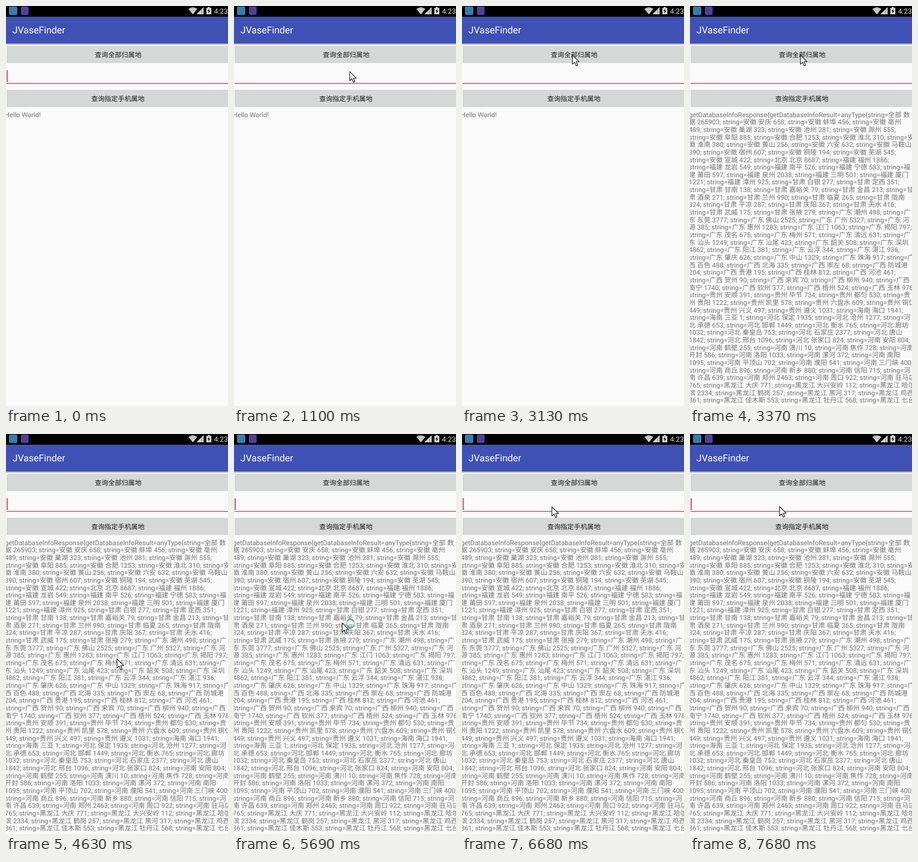
An HTML page that plays this animation: 373x673 px, repeating every 8 s.

```html
<!DOCTYPE html>
<html lang="zh-CN">
<head>
<meta charset="utf-8">
<title>JVaseFinder</title>
<style>
  html, body { margin: 0; width: 100%; height: 100%; overflow: hidden; background: #fafafa; }
  svg { display: block; width: 100vw; height: 100vh; }
  text {
    font-family: Roboto, "Noto Sans CJK SC", "Noto Sans CJK", sans-serif;
    font-size: 11.2px;
    text-rendering: geometricPrecision;
    white-space: pre;
  }
  .label { fill: #1c1c1c; font-weight: 500; text-anchor: middle; }
  .body { fill: #737373; }
</style>
</head>
<body>
<svg viewBox="0 0 373 673" xmlns="http://www.w3.org/2000/svg">
  <defs>
    <linearGradient id="shade" x2="0" y2="1">
      <stop offset="0" stop-color="#000" stop-opacity=".38"/>
      <stop offset="1" stop-color="#000" stop-opacity="0"/>
    </linearGradient>
  </defs>
  <rect width="373" height="673" fill="#fafafa"/>

  <!-- status bar -->
  <rect width="373" height="18" fill="#000"/>
  <rect x="5" y="1" width="14" height="14" rx="2" fill="#347fae"/>
  <rect x="25" y="1" width="13" height="14" rx="2" fill="#50409c"/>
  <g fill="#d4d4d4">
    <path d="M306.500 5 Q314 -0.500 321.500 5 L314 14Z"/>
    <path d="M320 14 L332 2 V14Z"/>
    <path d="M336.500 3.200 H339 V1.800 H342.500 V3.200 H345 V14 H336.500Z"/>
  </g>
  <path d="M307.500 6.500 Q314 1.500 320.500 6.500 M309.500 9 Q314 5.500 318.500 9" fill="none" stroke="#000" stroke-opacity=".35" stroke-width=".7"/>
  <path d="M329 5 V14" stroke="#000" stroke-opacity=".5" stroke-width=".8"/>
  <path d="M341.500 4.500 L338.500 9 H340.500 L339.800 12.500 L343 8 H341Z" fill="#000"/>
  <text x="349.500" y="13" fill="#d8d8d8" style="font-size:12px">4:23</text>

  <!-- app bar -->
  <rect y="18" width="373" height="45" fill="#3f51b5"/>
  <rect y="63" width="373" height="3.500" fill="url(#shade)"/>
  <text x="10.800" y="46" fill="#fff" style="font-size:16px">JVaseFinder</text>

  <!-- form -->
  <rect id="button" x="1" y="67" width="380" height="29" rx="1.600" fill="#d6d7d7"/>
  <text class="label" x="188.500" y="86">查询全部归属地</text>
  <rect id="caret" x="1" y="108" width="2" height="20" fill="#ff4081"/>
  <rect x="1" y="129.500" width="380" height="1.600" fill="#ff4081"/>
  <rect x="1" y="141" width="380" height="29" rx="1.600" fill="#d6d7d7"/>
  <text class="label" x="188" y="160">查询指定手机属地</text>

  <text id="hello" class="body" x="-2" y="186.600">Hello World!</text>
  <g id="result" class="body"></g>

  <g id="pointer">
    <path d="M.5 .5 V16 L4.200 12.600 L6.700 18.600 L9.200 17.500 L6.700 11.700 H11.600Z" fill="#fff" stroke="#1b1f2c" stroke-width="1.100" stroke-linejoin="round"/>
    <g id="busy" fill="none" stroke-width="2">
      <circle r="6.800" stroke="#a9d2d0"/>
      <circle r="6.800" stroke="#47a19f" stroke-dasharray="13 8.360"/>
    </g>
  </g>
</svg>
<script>
const LOOP = 8000, STEP = 79, BASELINE = 186.6, LINE_HEIGHT = 12.65;
const el = id => document.getElementById(id);
const [button, caret, hello, result, pointer, busy] =
  ['button', 'caret', 'hello', 'result', 'pointer', 'busy'].map(el);

// "~" stands for "string="
const lines = `getDatabaseInfoResponse{getDatabaseInfoResult=anyType{~全部 数
据 265903; ~安徽 安庆 658; ~安徽 蚌埠 456; ~安徽 亳州
489; ~安徽 巢湖 323; ~安徽 池州 281; ~安徽 滁州 555;
~安徽 阜阳 885; ~安徽 合肥 1253; ~安徽 淮北 310; ~安
徽 淮南 380; ~安徽 黄山 256; ~安徽 六安 632; ~安徽 马鞍山
390; ~安徽 宿州 607; ~安徽 铜陵 194; ~安徽 芜湖 545;
~安徽 宣城 422; ~北京 北京 8687; ~福建 福州 1886;
~福建 龙岩 549; ~福建 南平 526; ~福建 宁德 583; ~福
建 莆田 597; ~福建 泉州 2038; ~福建 三明 501; ~福建 厦门
1221; ~福建 漳州 925; ~甘肃 白银 277; ~甘肃 定西 351;
~甘肃 甘南 138; ~甘肃 嘉峪关 79; ~甘肃 金昌 213; ~甘
肃 酒泉 271; ~甘肃 兰州 990; ~甘肃 临夏 265; ~甘肃 陇南
324; ~甘肃 平凉 287; ~甘肃 庆阳 367; ~甘肃 天水 416;
~甘肃 武威 175; ~甘肃 张掖 279; ~广东 潮州 498; ~广
东 东莞 3777; ~广东 佛山 2525; ~广东 广州 5327; ~广东 河
源 385; ~广东 惠州 1283; ~广东 江门 1063; ~广东 揭阳 797;
~广东 茂名 675; ~广东 梅州 571; ~广东 清远 631; ~广
东 汕头 1249; ~广东 汕尾 423; ~广东 韶关 508; ~广东 深圳
4862; ~广东 阳江 381; ~广东 云浮 344; ~广东 湛江 936;
~广东 肇庆 626; ~广东 中山 1329; ~广东 珠海 917; ~广
西 百色 488; ~广西 北海 335; ~广西 崇左 68; ~广西 防城港
204; ~广西 贵港 195; ~广西 桂林 812; ~广西 河池 461;
~广西 贺州 90; ~广西 来宾 70; ~广西 柳州 940; ~广西
南宁 1740; ~广西 钦州 377; ~广西 梧州 524; ~广西 玉林 976;
~贵州 安顺 391; ~贵州 毕节 734; ~贵州 都匀 530; ~贵
州 贵阳 1222; ~贵州 凯里 578; ~贵州 六盘水 609; ~贵州 铜仁
449; ~贵州 兴义 497; ~贵州 遵义 1031; ~海南 海口 1941;
~海南 三亚 1; ~河北 保定 1935; ~河北 沧州 1277; ~河
北 承德 653; ~河北 邯郸 1449; ~河北 衡水 765; ~河北 廊坊
1032; ~河北 秦皇岛 753; ~河北 石家庄 2377; ~河北 唐山
1842; ~河北 邢台 1096; ~河北 张家口 824; ~河南 安阳 804;
~河南 鹤壁 255; ~河南 潢川 10; ~河南 焦作 728; ~河南
开封 586; ~河南 洛阳 1033; ~河南 漯河 372; ~河南 南阳
1095; ~河南 平顶山 702; ~河南 濮阳 541; ~河南 三门峡 400;
~河南 商丘 896; ~河南 新乡 880; ~河南 信阳 715; ~河
南 许昌 639; ~河南 郑州 2463; ~河南 周口 922; ~河南 驻马店
765; ~黑龙江 大庆 771; ~黑龙江 大兴安岭 112; ~黑龙江 哈尔
滨 2334; ~黑龙江 鹤岗 257; ~黑龙江 黑河 317; ~黑龙江 鸡西
861; ~黑龙江 佳木斯 553; ~黑龙江 牡丹江 568; ~黑龙江 七台`.split('\n');

lines.forEach((line, i) => {
  const row = document.createElementNS('http://www.w3.org/2000/svg', 'text');
  row.setAttribute('x', -2);
  row.setAttribute('y', (BASELINE + i * LINE_HEIGHT).toFixed(2));
  row.textContent = line.replaceAll('~', 'string=');
  result.append(row);
});

// Caret toggles, starting visible
const blinks = [150, 620, 1100, 1650, 2120, 2670, 3130, 3680, 4150, 4630,
  5180, 5650, 6200, 6680, 7220, 7680];

// Pointer moves, sampled in steps; px and py are ease-out powers
const moves = [
  { at: 460, n: 11, from: [317, 700], to: [185, 82], px: 1.58, py: 1.82 },
  { at: 4150, n: 7, from: [185, 82], to: [186, 378], px: 1.5, py: 1.5 },
  { at: 5570, n: 11, from: [186, 378], to: [152, 124], px: 0.75, py: 1.36 },
  { at: 6440, n: 2, from: [152, 124], to: [150.5, 122], px: 1, py: 1 },
  { at: 7220, n: 1, from: [150.5, 122], to: [150, 121.5], px: 1, py: 1 }
];

function pointerAt(t) {
  const m = moves.findLast(move => t >= move.at);
  if (!m) return null;
  const k = Math.floor((t - m.at) / STEP + 0.05);
  const left = 1 - Math.min(1, (k + 1) / m.n);
  const ease = (i, p) => m.to[i] + (m.from[i] - m.to[i]) * left ** p;
  return [ease(0, m.px), ease(1, m.py)];
}

const show = (node, on) => node.setAttribute('visibility', on ? 'inherit' : 'hidden');

function draw(t) {
  show(caret, blinks.filter(b => t >= b).length % 2 === 0);
  button.setAttribute('fill', t < 2120 || t >= 2360 ? '#d6d7d7' : t < 2200 ? '#c9caca' : '#babbbb');
  show(hello, t < 3370);
  show(result, t >= 3370);

  const pos = pointerAt(t);
  show(pointer, pos);
  if (pos) pointer.setAttribute('transform', `translate(${pos[0].toFixed(2)} ${pos[1].toFixed(2)})`);
  show(busy, pos && t >= 5570 && t < 6280);
  const turn = Math.floor((t - 5570) / STEP + 0.05) * 36;
  busy.setAttribute('transform', `translate(14.5 1.5) rotate(${turn})`);
}

function frame(now) {
  draw(now % LOOP);
  requestAnimationFrame(frame);
}
draw(0);
requestAnimationFrame(frame);
</script>
</body>
</html>
```
